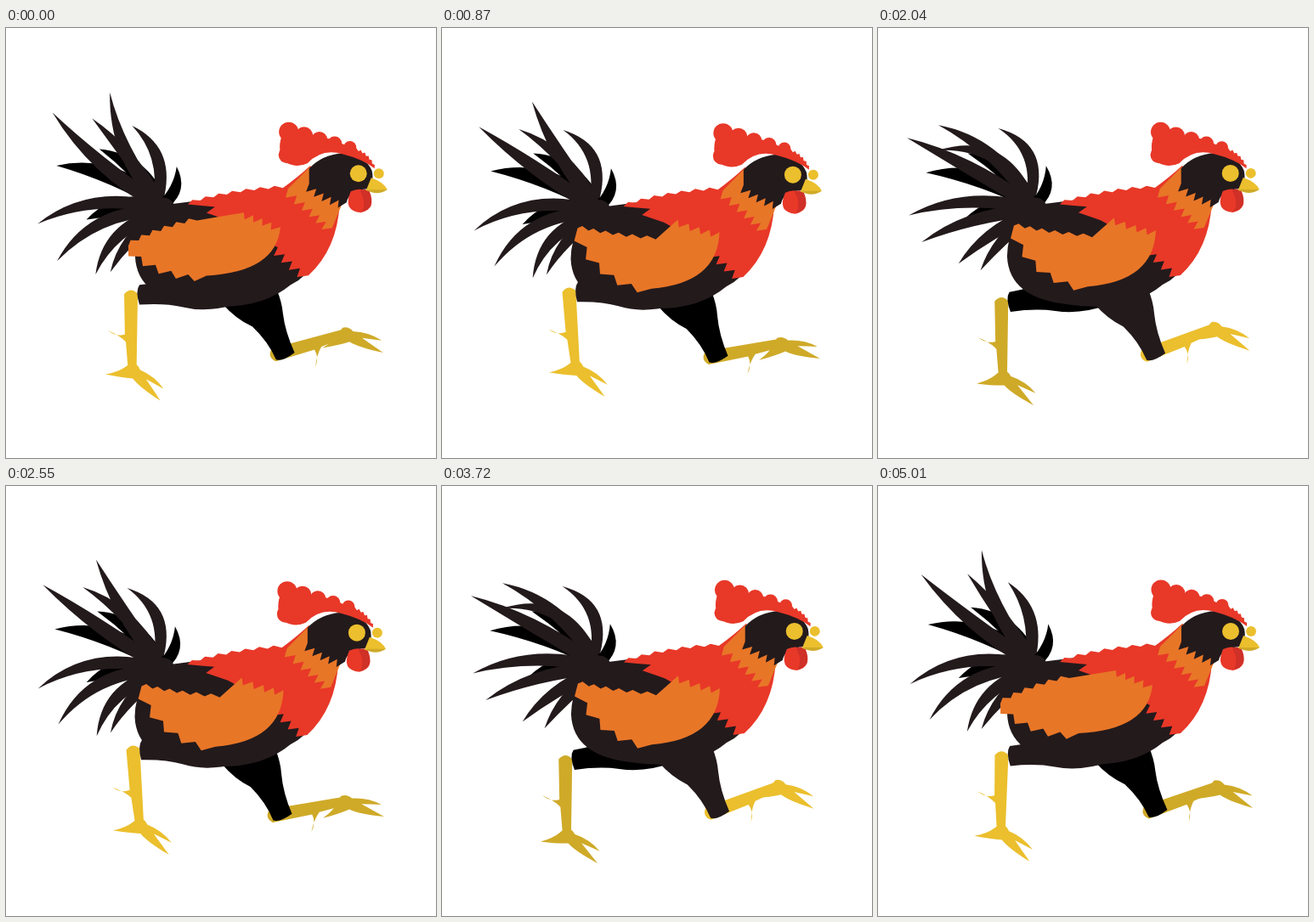
Recreate the animation shown at these times as an HTML page with a canvas. Size 506 by 506 pixels, loop 5.04 s.

```html
<!DOCTYPE html>
<html lang="en">
<head>
<meta charset="utf-8">
<title>Running rooster</title>
<style>
html, body { margin: 0; width: 100%; height: 100%; overflow: hidden; background: #fff; }
canvas { display: block; width: 506px; height: 506px; }
</style>
</head>
<body>
<canvas id="stage" width="506" height="506"></canvas>
<script>
const ctx = document.getElementById('stage').getContext('2d');
const LOOP = 1680, STRIDE = 840, STEP = 420, TAU = Math.PI * 2, DEG = Math.PI / 180;
const DARK = '#231a1c', BLACK = '#000', RED = '#e83828', ORANGE = '#e87627';
const YELLOW = '#ebbf2d', SHADE = '#cfaa28';

const { sin, cos, abs, min, max, hypot, atan2, acos } = Math;
const mix = (a, b, u) => a + (b - a) * u;
const clamp = (v, lo, hi) => min(hi, max(lo, v));
const smooth = u => { u = clamp(u, 0, 1); return u * u * (3 - 2 * u); };

// mean plus harmonics: cosine and sine weights
const wave = (a, mean, cs, sn) =>
  cs.reduce((s, c, i) => s + c * cos((i + 1) * a), mean) +
  sn.reduce((s, c, i) => s + c * sin((i + 1) * a), 0);

// closed clockwise outline; an edge is [x, y, control x, control y, teeth, tooth depth]
function outline(x, y, ...edges) {
  const p = new Path2D();
  p.moveTo(x, y);
  for (const [tx, ty, cx = (x + tx) / 2, cy = (y + ty) / 2, teeth = 0, depth = 0] of edges) {
    if (!teeth) p.quadraticCurveTo(cx, cy, tx, ty);
    for (let k = 1; k <= teeth * 2; k++) {
      const u = k / teeth / 2, d = k % 2 ? depth : 0;
      const dx = mix(cx - x, tx - cx, u), dy = mix(cy - y, ty - cy, u), len = hypot(dx, dy);
      p.lineTo(mix(mix(x, cx, u), mix(cx, tx, u), u) + dy / len * d - abs(d) * .4,
               mix(mix(y, cy, u), mix(cy, ty, u), u) - dx / len * d);
    }
    x = tx;
    y = ty;
  }
  p.closePath();
  return p;
}

const BODY = outline(152, 268, [192, 207, 153, 222], [330, 190], [372, 225], [335, 302, 372, 285],
  [225, 325, 295, 335], [152, 268, 154, 318]);
const CAPE = outline(214, 207, [326, 188, 266, 191, 7, 3], [358, 162, 344, 175], [393, 206, 380, 176],
  [356, 291, 390, 260], [320, 258, 336, 274, 4, 8], [262, 226], [236, 217], [246, 210], [214, 207]);
const NECK = outline(332, 189, [358, 163], [396, 206, 382, 172], [384, 235], [332, 189, 364, 213, 6, 8]);
const HEAD = outline(357, 165, [396, 147, 372, 149], [431, 168, 424, 150], [425, 189, 434, 183],
  [401, 205, 404, 191], [357, 183, 378, 199, 5, 8]);
const COMB = outline(325, 126, [410, 143, 370, 120], [434, 165, 426, 147, 6, 3], [396, 148, 420, 154],
  [355, 159, 372, 141], [330, 158, 342, 165], [325, 126, 318, 146]);
const BEAK = outline(430, 176, [449, 190, 445, 181], [424, 191, 436, 195]);
const BEAK_LOW = outline(424, 190, [449, 190], [424, 190, 437, 198]);
const WATTLE = outline(406, 192, [426, 192, 416, 187], [418, 217, 438, 212], [406, 192, 396, 215]);
const WATTLE_DARK = outline(417, 191, [428, 192, 424, 188], [419, 216, 436, 211], [417, 191, 425, 205]);
// limbs lie along the x axis
const THIGH = outline(-5, 0, [5, -32], [65, -24, 40, -36], [112, -12, 85, -15], [108, 11, 114, 5],
  [60, 15, 85, 8], [20, 31, 42, 27]);
const SHANK = outline(0, -8, [89, -5, 30, -7], [89, 5, 95, 0], [57, 7], [43, 28, 49, 14], [48, 8, 51, 18],
  [0, 8], [0, -8, -9, 0]);
const FOOT = outline(-6, -4, [7, -6, 0, -9], [42, -12, 24, -14], [20, -4], [50, 0], [9, 7, 22, 8],
  [-16, 28, 0, 16], [-7, 5, -8, 15]);

// rest angle above the left horizon, length, bow, half width
const FAN = [
  [-48, 88, 10, 9], [-40, 104, 20, 10], [-23, 134, 27, 10], [-8, 144, 30, 10],
  [30, 166, 5, 12], [51, 142, 5, 11], [41, 124, 24, 10], [71, 90, 26, 10]
];
const UNDER = [[17, 134, 22, 17], [-14, 92, 14, 16], [38, 100, 18, 15], [106, 48, 14, 9]];

function fill(path, color) {
  ctx.fillStyle = color;
  ctx.fill(path);
}

function dot(x, y, r, color) {
  const p = new Path2D();
  p.arc(x, y, r, 0, TAU);
  fill(p, color);
}

function placed(x, y, angle, scale, path, color) {
  ctx.save();
  ctx.translate(x, y);
  ctx.rotate(angle);
  ctx.scale(scale, 1);
  fill(path, color);
  ctx.restore();
}

// two-bone leg: the ankle follows a cyclic path, the knee follows from the bone lengths
function leg(time, [hx, hy], skin, color) {
  const a = time / STRIDE * TAU, shin = 88;
  const ax = wave(a, 281, [-133, -7, 7.6], [14, 7]);
  const ay = wave(a, 395, [17, -15, 4], [-28, 6]);
  const toe = wave(a, 25.5, [10.6, 12.5], [9.3, -6.4]);
  const thigh = 102 + 28 * max(0, cos(a + .5));
  const reach = hypot(ax - hx, ay - hy);
  const bend = acos(clamp((thigh ** 2 + reach ** 2 - shin ** 2) / (2 * thigh * reach), -1, 1));
  const dir = atan2(ay - hy, ax - hx) + bend;
  const kx = hx + thigh * cos(dir), ky = hy + thigh * sin(dir);

  placed(kx, ky, atan2(ay - ky, ax - kx), hypot(ax - kx, ay - ky) / 89, SHANK, skin);
  placed(ax, ay, toe * DEG, 1, FOOT, skin);
  const dx = kx + 12 - hx, dy = ky - hy;
  placed(hx, hy, atan2(dy, dx), hypot(dx, dy) / 108, THIGH, color);
}

function feather(x, y, angle, len, bow, width, color) {
  const p = new Path2D();
  p.moveTo(0, 7);
  p.quadraticCurveTo(len * .55, bow + width, len, 0);
  p.quadraticCurveTo(len * .5, bow - width, 0, -7);
  ctx.save();
  ctx.translate(x, y);
  ctx.scale(-1, -1);
  ctx.rotate(angle * DEG);
  fill(p, color);
  ctx.restore();
}

// the sway runs through the fan, each feather a little out of step with the next
function tail(time, x, y) {
  const sway = lead => wave((time + lead) / LOOP * TAU, 0, [4, 7], [0, 9]);
  for (const [angle, len, bow, width] of UNDER)
    feather(x + 3, y, angle + sway(0) * .3, len, bow, width, BLACK);
  FAN.forEach(([angle, len, bow, width], i) => {
    const s = sway((i - 4) * 120) * (i < 4 ? .45 : 1);
    feather(x - 2, y + 12 - 3 * i, angle + s, len, bow - 1.8 * s, width, DARK);
  });
  dot(x + 3, y + 5, 14, DARK);
}

// the wing lifts briefly once per loop
function wing(time) {
  const away = abs((time + LOOP / 2) % LOOP - LOOP / 2);
  const u = smooth((away - 40) / 200);
  const at = (x0, y0, x1, y1) => [mix(x0, x1, u), mix(y0, y1, u)];
  const tip = at(144, 256, 160, 232);
  fill(outline(...tip,
    [...at(225, 226, 252, 246), ...at(180, 236, 197, 242), 6, 4],
    at(280, 217, 278, 223),
    [...at(323, 234, 327, 238), ...at(302, 222, 304, 233), 4, -7],
    [...at(236, 291, 247, 304), ...at(318, 287, 325, 298)],
    [...tip, ...at(180, 291, 184, 294), 5, 7]), ORANGE);
}

function draw(time) {
  const p = time % STEP;
  const drop = (.5 + .5 * cos((p - 180) / STEP * TAU)) ** 1.5;
  const lift = cos(clamp((p - 270) / 100, -1, 1) * Math.PI / 2) ** 2;
  const rx = -6 * drop, ry = 37 * drop;
  const hx = -26 * drop, hy = 20 * drop - 14 * lift;
  const tilt = (hy - ry) / 200, squeeze = (hx - rx) / 200;
  const pose = (k, b, dx, dy) => ctx.setTransform(1 + k, b, 0, 1, dx, dy);
  const lean = k => pose(k, tilt, rx - 215 * k, ry - 215 * tilt);
  const level = () => pose(0, 0, 0, 0);
  const hip = [272 + rx, 292 + ry + 57 * tilt];

  level();
  ctx.fillStyle = '#fff';
  ctx.fillRect(0, 0, 506, 506);
  leg(time + STEP, hip, SHADE, BLACK);
  tail(time, 182 + rx, 208 + ry);
  lean(0);
  fill(BODY, DARK);
  level();
  leg(time, hip, YELLOW, DARK);
  lean(squeeze);
  fill(CAPE, RED);
  lean(0);
  wing(time);
  lean(squeeze);
  fill(NECK, ORANGE);

  pose(0, 0, hx, hy);
  dot(439, 171, 6, YELLOW);
  fill(HEAD, DARK);
  fill(WATTLE, RED);
  fill(WATTLE_DARK, '#cf3027');
  fill(BEAK, YELLOW);
  fill(BEAK_LOW, SHADE);

  // the comb trails behind when the head rises
  pose(0, 0, hx - 8 * lift, hy + 17 * lift);
  fill(COMB, RED);
  for (let i = 0; i < 5; i++) dot(333 + 18 * i, 122 + 4.6 * i, 11.5 - i, RED);
  dot(331, 149, 10, RED);

  pose(0, 0, hx, hy);
  dot(415, 171, 10, YELLOW);
}

function frame() {
  draw(Math.floor(performance.now() / 30) * 30 % LOOP);
  requestAnimationFrame(frame);
}
frame();
</script>
</body>
</html>
```
